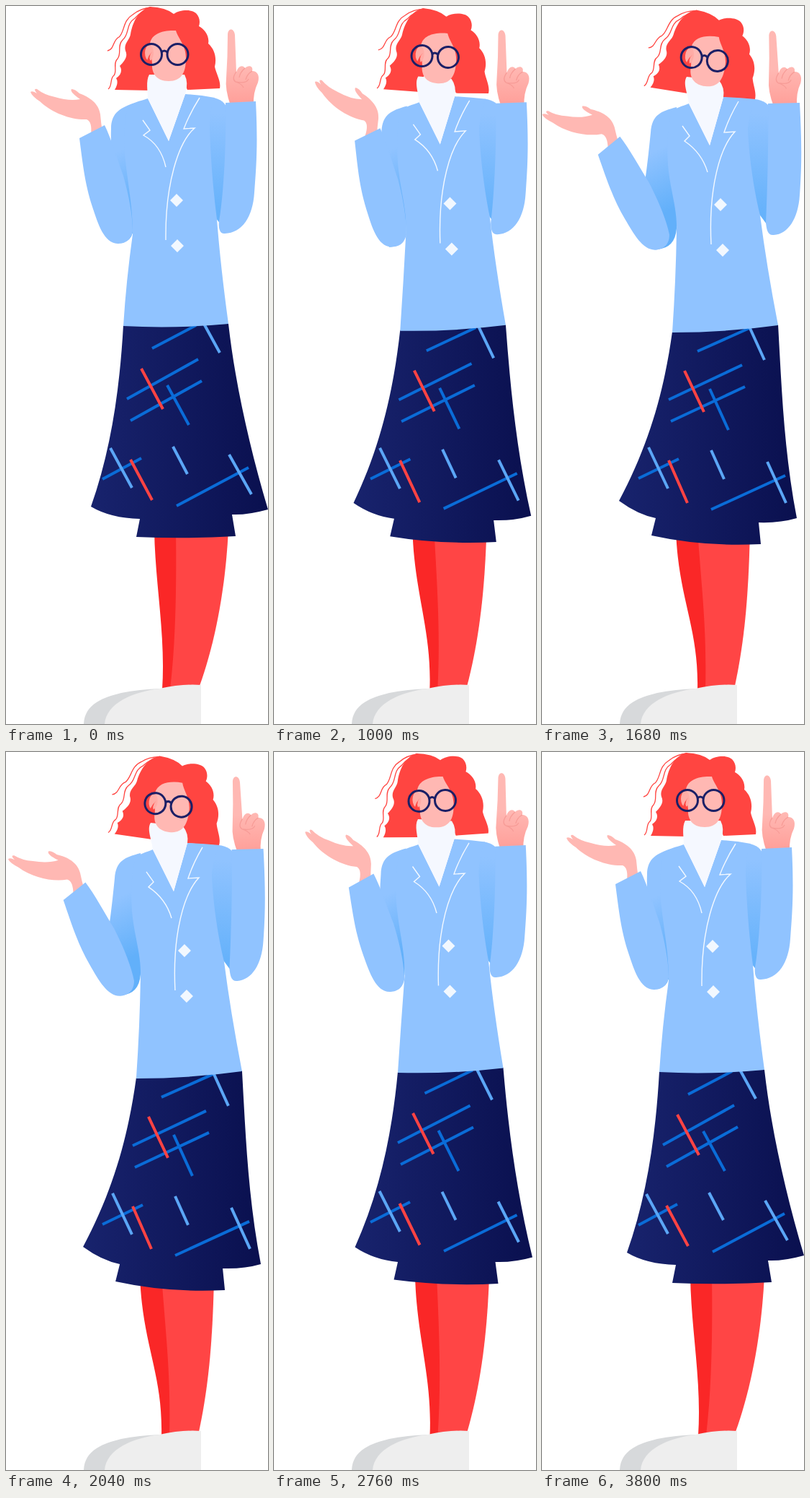
Write an HTML page that moves like this. It is 364 by 994 pixels and loops after 3.84 s.

```html
<!DOCTYPE html>
<html lang="en">
<head>
<meta charset="utf-8">
<title>Gesturing woman</title>
<style>
  html, body { margin: 0; height: 100%; overflow: hidden; background: #fff; }
  svg { display: block; width: 100vw; height: 100vh; }
  .line { fill: none; stroke-width: 4; }
  .jacket { fill: #90c3ff; }
  .skin { fill: #ffb8b3; }
  .seam { fill: none; stroke: #f4f9ff; stroke-width: 1.4; }
  .strand { fill: none; stroke: #ff4541; stroke-width: 1.3; }
  .crease { fill: none; stroke: #f79c97; stroke-width: 1.3; }
  .glasses { fill: none; stroke: #1b1f66; stroke-width: 3; }
</style>
</head>
<body>
<svg viewBox="0 0 364 994" preserveAspectRatio="none">
  <defs>
    <linearGradient id="skirt"><stop stop-color="#18236d"/><stop offset="1" stop-color="#0a104f"/></linearGradient>
    <linearGradient id="shadeL" gradientUnits="userSpaceOnUse" x1="148" y1="205" x2="184" y2="280">
      <stop stop-color="#90c3ff"/><stop offset="1" stop-color="#62b0fa"/></linearGradient>
    <linearGradient id="shadeR" gradientUnits="userSpaceOnUse" x1="306" y1="150" x2="296" y2="285">
      <stop stop-color="#90c3ff"/><stop offset="1" stop-color="#66b2fb"/></linearGradient>
    <linearGradient id="palm" gradientUnits="userSpaceOnUse" x1="0" y1="85" x2="0" y2="136">
      <stop stop-color="#ffb8b3"/><stop offset="1" stop-color="#ff9f99"/></linearGradient>
  </defs>

  <!-- legs and shoes -->
  <path fill="#ff4545" d="M230,725 L309,725 C305,805 291,880 269,941 L222,946Z"
    data-to="M212,725 L289,725 C287,820 281,880 268,941 L222,946Z"/>
  <path fill="#fa2727" d="M206,725 C207,800 222,870 217,946 L228,946 C236,880 237,800 236,725Z"
    data-to="M186,725 C189,820 218,860 216,946 L227,946 C229,860 222,810 216,725Z"/>
  <path fill="#d7d9db" d="M108,994 C109,966 136,957 160,951 Q185,946 215,945 L200,994Z"/>
  <path fill="#eee" d="M137,994 C140,965 175,950 213,945 Q245,938 271,940 V994Z"/>

  <g class="head">
    <path fill="#ff4541" d="M151,116 Q157,106 153,100 C160,95 162,89 158,83 C164,77 170,70 166,62 C163,52 172,47 173,39
      C176,22 184,6 200,1 Q222,2 233,11 C241,5 258,4 264,10 C269,15 270,22 268,28 C276,32 283,42 281,52
      C290,60 293,72 290,84 C292,94 299,104 297,114 L252,116 L240,90 L206,95 L202,117Z"/>
    <path class="strand" d="M141,62 C151,60 148,47 157,43 C165,36 162,20 176,12 Q187,3 202,2"/>
    <path class="strand" d="M142,115 C148,111 144,100 150,96 C155,90 148,79 155,73 C161,66 154,55 162,47 C172,39 166,25 179,17 Q188,6 204,3"/>
  </g>

  <g id="body">
    <path fill="url(#skirt)" d="M163,442 C158,530 146,615 118,693 Q145,709 186,710 L181,735 Q250,738 319,734 L314,704 Q335,705 364,697 C338,610 318,520 309,440Z"
      data-to="M181,451 C170,530 150,605 107,685 Q133,704 158,709 L152,733 Q225,749 304,745 L301,715 Q330,716 354,709 C336,615 333,530 328,441Z"/>
    <path class="line" stroke="#0a6cd8" d="M203,474L264,442M168,544L267,489M173,574L272,519M224,525L254,580M134,655L188,626M237,692L337,639"
      data-to="M216,478L288,446M176,545L278,497M179,575L282,527M233,530L259,587M134,654L190,627M235,697L338,650"/>
    <path class="line" stroke="#5ba6f6" d="M275,440L297,480M145,612L175,667M232,610L252,648M310,621L341,676"
      data-to="M288,444L309,490M148,611L175,668M235,615L253,655M313,631L339,688"/>
    <path class="line" stroke="#ff4343" d="M188,502L218,558M173,628L203,684" data-to="M198,505L225,562M176,629L202,688"/>

    <!-- left arm -->
    <path fill="url(#shadeL)" d="M180,134 C160,140 146,147 146,170 C145,195 148,230 152,250 L160,325 Q172,328 176,314 L180,200Z"
      data-to="M187,140 C165,146 153,150 151,175 C148,205 145,230 142,250 L160,337 Q185,335 187,308 L190,200Z"/>
    <g id="forearm">
      <path id="palmL" class="skin" d="M118,178 Q120,160 112,157 C92,158 65,149 47,132 Q36,125 34,119 Q37,117 43,121 Q37,114 43,115
        Q53,123 68,126 Q88,132 103,129 Q88,119 91,115 Q96,115 102,121 C116,126 129,135 131,150 Q132,162 134,175Z"/>
      <path class="jacket" d="M102,183 L137,165 C146,183 155,213 163,235 C170,260 176,288 176,312 C173,326 164,329 155,329 C136,328 128,302 120,278 C110,248 107,222 102,183Z"/>
    </g>

    <!-- right arm -->
    <path fill="url(#shadeR)" d="M270,165 L287,127 C297,128 306,134 308,145 L310,230 L301,306 L285,285Z"
      data-to="M272,165 L295,129 C308,130 316,136 318,145 L320,230 L318,310 L292,275Z"/>
    <g id="palmR">
      <path fill="url(#palm)" d="M308,40 C308,30 317,30 318,40 L320,92 C322,83 329,81 332,86 C337,81 344,83 342,90 C349,90 353,96 350,106
        Q343,120 344,138 L312,138 Q304,115 306,100 Q308,70 308,40Z"/>
      <path class="crease" d="M320,91 Q313,101 319,105 Q334,108 337,101 M332,86 Q325,92 324,99 M342,90 Q335,94 333,102 M319,105 Q328,108 330,113"/>
    </g>
    <path class="jacket" data-track="reach" d="M305,134 L347,132 C350,190 348,220 345,258 C343,292 328,314 304,315 C296,316 295,305 296,298 C303,255 306,190 305,134Z"
      data-to="M314,135 L358,134 C361,190 361,220 358,262 C356,294 342,316 322,317 C313,318 312,308 311,300 C313,255 315,190 314,135Z"/>

    <!-- jacket -->
    <path class="jacket" d="M197,128 C185,132 176,134 170,138 C163,160 163,190 166,215 C170,250 176,280 176,316 Q167,380 163,443 Q236,447 309,440 Q298,360 293,295 C287,250 284,200 283,170 C283,155 286,135 290,127 Q270,123 249,122 L226,187Z"
      data-to="M204,135 C194,139 187,141 180,145 C175,165 173,190 175,220 C178,255 188,280 187,310 Q186,380 181,452 Q256,452 328,442 Q312,360 303,290 C293,250 287,200 286,170 C287,155 292,138 297,129 Q275,127 252,126 L233,193Z"/>
    <path class="seam" d="M190,158 L200,172 L191,179 Q215,192 222,223 M269,127 Q255,149 247,170 L262,169 C240,188 221,245 222,324"
      data-to="M195,166 L205,180 L198,187 Q222,203 230,230 M273,132 Q260,154 253,175 L268,174 C248,195 231,250 235,330"/>
    <path fill="#f2f8ff" d="M237,260L246,269L237,278L228,269ZM238,323L247,332L238,341L229,332Z"
      data-to="M248,266L257,275L248,284L239,275ZM251,329L260,338L251,347L242,338Z"/>
    <path fill="#f5f8ff" d="M199,95 C194,104 197,118 197,128 L226,187 L249,122 Q254,106 248,95Z"
      data-to="M201,98 C195,107 203,122 204,135 L233,193 L252,126 Q254,113 246,103Z"/>
  </g>

  <g class="head">
    <path class="skin" d="M200,52 C202,38 219,33 236,34 C239,45 250,54 250,72 C250,92 244,104 226,104 C208,104 202,92 203,79Z"/>
    <ellipse cx="199" cy="65" rx="6" ry="11" fill="#ffaca6"/>
    <path fill="#ff4541" d="M203,63 Q196,71 203,81 L197,85 Q193,74 203,63Z"/>
    <g class="glasses">
      <circle cx="202" cy="67" r="14.5"/><circle cx="238.5" cy="67" r="14.5"/><path d="M216,64 Q220,60 224,64"/>
    </g>
  </g>
</svg>
<script>
const LOOP = 3840;
const times = [0, 560, 1000, 1640, 1960, 2320, 2760, 3240, LOOP];
const tracks = {
  lean:    [0, 0, .68, 1, 1, .93, .5, 0, 0],
  reach:   [0, 0, .35, 1, 1, .6, .25, 0, 0],
  hop:     [0, 0, .5, 0, 0, -.5, -3.5, 0, 0],
  headX:   [0, 0, 3.5, 5.5, 5.5, 2.5, -.5, 0, 0],
  headY:   [0, 0, 3, 6.5, 6.5, 5.5, .5, 0, 0],
  headTilt:[0, 0, 3, 7.7, 7.7, 1.5, -1.5, 0, 0],
  elbowX:  [0, 0, 8, 0, 0, 8, 5, 0, 0],
  elbowY:  [0, 0, 4, 9, 9, 9.5, 6.5, 0, 0],
  forearm: [0, 0, 1, -12, -12, -7, -1.5, 0, 0],
  palmL:   [0, 6.5, 11.2, 4, 4, 8.3, 9.5, 3.4, 0],
  palmR:   [0, 1, 0, -1.7, -1.7, -1.5, .6, 1.7, 0]
};

// Monotone cubic through the keys, at rest on every extreme.
function sample(keys, t) {
  const slope = i => (keys[i + 1] - keys[i]) / (times[i + 1] - times[i]);
  const tangent = i => {
    if (i === 0 || i === keys.length - 1) return 0;
    const a = slope(i - 1), b = slope(i);
    return a * b > 0 ? 2 * a * b / (a + b) : 0;
  };
  const i = times.findIndex((end, k) => k && t < end) - 1;
  const span = times[i + 1] - times[i], u = (t - times[i]) / span;
  const s = u * u * (3 - 2 * u);
  return keys[i] + (keys[i + 1] - keys[i]) * s
    + span * u * (1 - u) * ((1 - u) * tangent(i) - u * tangent(i + 1));
}

const number = /-?[\d.]+/g;
const morphs = [...document.querySelectorAll('[data-to]')].map(path => ({
  path,
  from: path.getAttribute('d'),
  to: path.dataset.to.match(number),
  track: path.dataset.track || 'lean'
}));
const heads = document.querySelectorAll('.head');

function place(node, x, y, angle = 0, cx = 0, cy = 0) {
  node.setAttribute('transform', `translate(${x} ${y}) rotate(${angle} ${cx} ${cy})`);
}
const part = id => document.getElementById(id);

function draw() {
  const t = performance.now() % LOOP, pose = {};
  for (const name in tracks) pose[name] = sample(tracks[name], t);

  for (const { path, from, to, track } of morphs) {
    let i = 0;
    path.setAttribute('d', from.replace(number, n => (+n + (to[i++] - n) * pose[track]).toFixed(2)));
  }
  for (const head of heads) place(head, pose.headX, pose.headY, pose.headTilt, 220, 67);
  place(part('body'), 0, pose.hop);
  place(part('forearm'), pose.elbowX, pose.elbowY, pose.forearm, 155, 305);
  place(part('palmL'), 0, 0, pose.palmL, 125, 168);
  place(part('palmR'), 10 * pose.reach, 1.5 * pose.reach, pose.palmR, 327, 130);
  requestAnimationFrame(draw);
}
draw();
</script>
</body>
</html>
```
